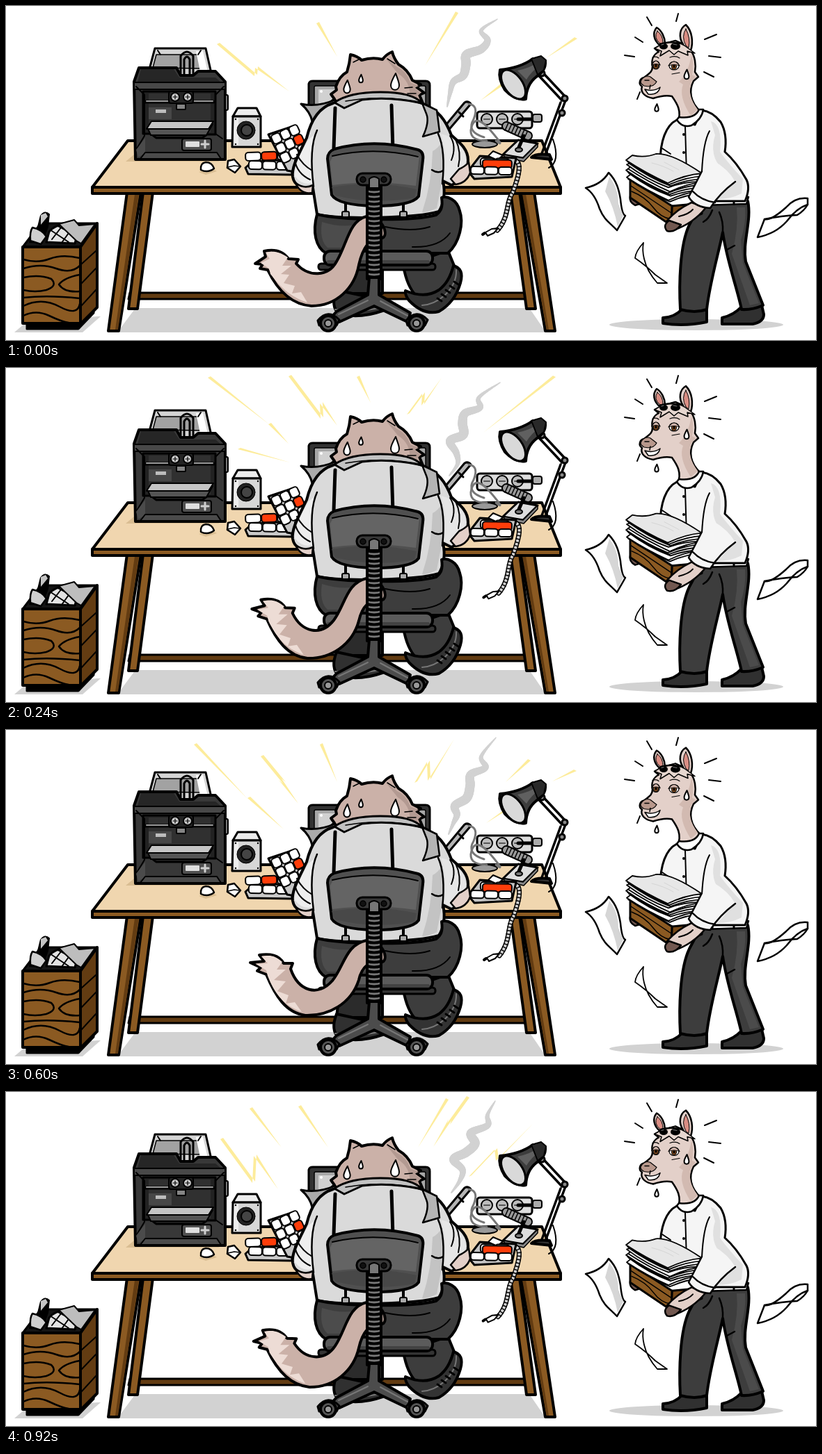
Animation of 1164 by 481 pixels, one loop 1000 ms. Source, as an HTML page with a canvas:

```html
<!DOCTYPE html>
<html lang="en">
<head>
<meta charset="utf-8">
<title>Busy workshop</title>
<style>
html, body { margin: 0; width: 100%; height: 100%; overflow: hidden; background: #fff; }
canvas { display: block; width: 1164px; height: 481px; }
</style>
</head>
<body>
<canvas id="stage"></canvas>
<script>
const W = 1164, H = 481;
const INK = '#000', WOOD = '#8b5a22', DARKWOOD = '#633c12', SHADOW = '#d2d2d2';
const COAL = '#3d3d3d', SHIRT = '#dadada', FUR = '#cbb1a8', CREAM = '#e3d0c9', RED = '#ff3d0a';
const canvas = document.getElementById('stage');
const ratio = window.devicePixelRatio || 1;
canvas.width = W * ratio;
canvas.height = H * ratio;
const ctx = canvas.getContext('2d');

function put(d, fill, width = 0, stroke = INK) {
  const path = new Path2D(d);
  if (fill) { ctx.fillStyle = fill; ctx.fill(path); }
  if (width) { ctx.strokeStyle = stroke; ctx.lineWidth = width; ctx.stroke(path); }
}
const line = (d, width = 2, color = INK) => put(d, null, width, color);

function oval(x, y, rx, ry, fill, width = 0, angle = 0) {
  ctx.beginPath();
  ctx.ellipse(x, y, rx, ry, angle, 0, 7);
  if (fill) { ctx.fillStyle = fill; ctx.fill(); }
  if (width) { ctx.strokeStyle = INK; ctx.lineWidth = width; ctx.stroke(); }
}

function box(x, y, w, h, r, fill, width = 0) {
  ctx.beginPath();
  ctx.roundRect(x, y, w, h, r);
  ctx.fillStyle = fill;
  ctx.fill();
  if (width) { ctx.strokeStyle = INK; ctx.lineWidth = width; ctx.stroke(); }
}

function tube(d, width, fill, edge = 3) {
  line(d, width);
  line(d, width - edge, fill);
  ctx.save();
  ctx.lineCap = 'butt';
  ctx.setLineDash([1.5, 3.5]);
  line(d, width);
  ctx.restore();
}

function at(x, y, angle, draw) {
  ctx.save();
  ctx.translate(x, y);
  ctx.rotate(angle);
  draw();
  ctx.restore();
}

const mix = (a, b, t) => a + (b - a) * t;

// Blends two paths that share the same commands.
function morph(a, b, t) {
  const ends = b.match(/-?\d+/g);
  let i = 0;
  return a.replace(/-?\d+/g, n => mix(+n, +ends[i++], t).toFixed(1));
}

function drop(x, y, s) {
  at(x, y, 0, () => {
    ctx.scale(s, s);
    put('M1-13C-4-4-6 0-6 4C-6 13 6 13 6 4C6 0 4-4 1-13Z', '#fff', 2 / s);
  });
}

const BOLTS = [
  [[303,55,357,101,358,89,407,123], [446,25,476,73], [650,10,602,86], [821,47,776,75], [715,114,682,136]],
  [[308,68,354,131,356,92,391,140], [350,24,396,80], [420,21,463,80], [636,11,592,80],
   [666,8,638,47,640,41,614,79], [665,122,702,83,704,99,757,46]],
  [[290,14,378,81], [377,81,406,109], [406,12,452,73,451,51,476,83], [504,13,524,50],
   [576,67,598,37,597,54,626,14], [333,117,408,136], [790,13,686,93]],
  [[270,21,347,99], [347,98,399,143], [366,38,398,77,392,72,420,106], [451,21,476,75],
   [587,76,605,46,606,73,644,13], [754,44,718,75], [820,59,785,74], [732,108,690,134]]
];

function bolt(p) {
  const points = [];
  for (let i = 0; i < p.length; i += 2) points.push([p[i], p[i + 1]]);
  const slant = p[0] < p[p.length - 2] ? 4 : -4;
  const back = points.slice(0, -1).reverse().map(([x, y]) => [x + slant, y - 2]);
  put('M' + points.concat(back).join('L') + 'Z', '#fdec9b');
}

const SMOKE = [
  [634,145, 638,126, 643,109, 657,100, 661,84, 662,70, 683,62, 692,49, 683,35, 706,19],
  [640,145, 652,128, 656,112, 643,97, 661,87, 674,74, 668,59, 692,48, 692,33, 703,13],
  [637,155, 649,138, 647,122, 638,105, 657,96, 656,79, 660,65, 681,57, 680,42, 710,21],
  [636,150, 643,134, 648,122, 645,109, 662,98, 667,80, 668,64, 689,54, 683,38, 704,11]
];

function smoke(k) {
  const i = Math.min(2, Math.floor(k)), t = Math.min(1, k - i);
  const p = SMOKE[i].map((v, n) => mix(v, SMOKE[i + 1][n], t));
  const last = p.length / 2 - 1;
  const point = n => { n = Math.max(0, Math.min(last, n)); return [p[2 * n], p[2 * n + 1]]; };
  const spline = (a, b, c, d, u) =>
    b + u * ((c - a) + u * ((2 * a - 5 * b + 4 * c - d) + u * (3 * b - a - 3 * c + d))) / 2;
  let from = point(0);
  ctx.strokeStyle = SHADOW;
  for (let s = 1; s <= 90; s++) {
    const q = s / 90, n = Math.min(last - 1, Math.floor(q * last));
    const around = [n - 1, n, n + 1, n + 2].map(point);
    const to = [0, 1].map(j => spline(...around.map(v => v[j]), q * last - n));
    ctx.lineWidth = 1.5 + 12 * Math.sin(Math.PI * q);
    ctx.beginPath();
    ctx.moveTo(...from);
    ctx.lineTo(...to);
    ctx.stroke();
    from = to;
  }
}

function floor() {
  put('M160 470L186 435H752L776 470Z', SHADOW);
  put('M12 470L26 458L131 447H136L110 470Z', SHADOW);
  oval(992, 459, 125, 8, SHADOW);
}

function bin() {
  put('M30 456V465H104L126 442V430Z', INK, 3);
  put('M24 347L50 313H131L107 347Z', '#151515', 3);
  put('M34 340L46 318L50 302Q56 294 62 300L60 318L52 341Z', INK, 2);
  put('M35 338Q34 325 38 319Q52 322 58 332L50 343Z', '#cfcfcf', 2.5);
  put('M50 301L57 298L60 303L50 315Z', '#c4c4c4');
  put('M58 340L62 325Q72 313 90 315L103 327L99 342Z', '#e4e4e4', 3);
  line('M66 324L90 340M75 317L101 331M83 314L66 336M95 320L80 341', 2);
  put('M76 314L98 308L105 316L128 314L108 342L101 338Z', '#bdbdbd', 2);
  put('M107 347L131 313V434L107 458Z', DARKWOOD, 4);
  put('M24 347H107V457H24Z', WOOD, 4);
  line('M25 365Q45 371 63 364T106 363M25 378Q50 370 72 378T106 374M25 432Q51 419 77 433T106 429M25 446Q43 437 62 446T90 456', 2.5);
  line('M25 391Q48 386 65 393Q75 403 58 409Q42 413 25 409M106 387Q84 391 76 401Q84 413 106 411M25 420Q60 416 106 421', 2.5);
  line('M108 372L130 352M108 400L130 377M108 432L130 408', 2);
}

function desk() {
  put('M178 413H758V422H176Z', DARKWOOD, 3);
  put('M197 268H211L189 436H176Z', WOOD, 4);
  put('M725 268H738L761 436H748Z', WOOD, 4);
  for (const [side, lit] of [['M174 268H194L162 468H147Z', 'M185 271H191L161 466H157Z'],
                             ['M740 268H759L789 468H775Z', 'M742 271H747L780 466H777Z']]) {
    put(side, WOOD, 4);
    put(lit, DARKWOOD);
  }
  put('M175 194H770L797 261H124Z', '#f0d6af', 4);
  put('M124 261H797V270H124Z', WOOD, 4);
  put('M184 214L172 224H305L318 218Z', '#d9bd92');
}

function printer() {
  put('M206 91L214 61H287L296 101H215Z', '#d5d5d5', 3);
  put('M211 89L216 70H279L284 90Z', '#a2a2a2', 1.5);
  put('M273 65H283L291 99H280Z', '#fff');
  line('M218 64L222 70M280 64L276 70', 2);
  line('M251 100V72Q260 60 269 72V100M256 100V77Q260 69 264 77V100', 3);
  put('M191 89H245L251 100H269L276 94H301L315 109V221H186L184 109Z', '#383838', 4);
  put('M194 91H241L249 103H301L309 110H189Z', '#262626');
  put('M184 110H315V120H184Z', '#484848', 2);
  put('M197 123H301V185H289L282 190H216L208 184H197Z', '#222', 3);
  put('M205 126H294V182H205Z', '#303030');
  put('M205 146H238V163H205Z', '#474747');
  line('M201 138H298', 5);
  line('M202 137H297', 2, '#999');
  box(234, 123, 35, 17, 3, '#242424', 2);
  for (const x of [243, 261]) {
    oval(x, 131, 6, 6, '#c9c9c9', 2);
    line(`M${x - 3} 131h6m-3-3v6`, 1.2);
  }
  box(245, 141, 13, 8, 1, '#858585', 2);
  box(215, 149, 15, 5, 0, '#bcbcbc');
  put('M204 177L208 186H288L297 170Z', '#555', 2);
  put('M209 166H298L291 177H202Z', '#c4c4c4', 2);
  line('M187 116L199 128V187L187 207M313 116L301 128V184L311 191', 2);
  put('M187 207L200 190V212L190 218Z', '#4b4b4b');
  box(253, 191, 42, 17, 3, '#505050', 2);
  box(258, 195, 20, 8, 1, '#dedede');
  line('M281 199H291M286 194V204', 3, '#cfcfcf');
  put('M193 220L200 211H303L309 220Z', '#4b4b4b', 2);
  box(315, 128, 4, 22, 2, '#777', 2);
}

function speaker() {
  put('M326 159L333 147H360L366 159Z', '#ececec', 3);
  put('M326 159H366V203H325Z', '#d7d7d7', 3);
  put('M328 161H334V200H328Z', '#eeeeee');
  oval(345, 179, 13, 13, '#222', 1);
  oval(346, 179, 8, 8, '#444', 2);
  for (const x of [330, 362]) for (const y of [163, 199]) oval(x, y, 1.2, 1.2, INK);
}

function keys(rows, cols, w, h, red) {
  for (let r = 0; r < rows; r++) for (let c = 0; c < cols; c++)
    box(c * w, r * h, w - 1, h - 1, 4, red.includes(r * cols + c) ? RED : '#fff', 2);
}

function keyboards() {
  put('M277 239L296 234L303 238L287 243Z', '#d9bd92');
  put('M280 236Q279 226 287 225Q296 225 299 234Q290 241 280 236Z', '#fff', 2.5);
  put('M318 233L319 223L328 221L337 231L329 240Z', '#fff', 2.5);
  line('M319 232L328 230L336 231', 1.5);
  put('M344 233L354 224L411 221V243L348 242Z', '#c9c9c9', 3);
  at(344, 211, -.03, () => keys(1, 3, 23, 13, [1]));
  at(349, 223, .02, () => keys(1, 3, 20, 13, []));
  put('M377 185L410 174L426 207L421 240L404 237Z', '#c6c6c6', 3);
  at(380, 187, -.43, () => keys(3, 3, 14, 15, [5]));
  put('M664 238L681 216L733 219L727 246L673 249Z', '#c4c4c4', 3);
  put('M693 216L700 209L714 215L706 222Z', '#fff', 2);
  at(682, 219, .02, () => { keys(1, 2, 21, 13, []); box(3, 2, 42, 12, 4, RED, 2); });
  at(668, 231, .02, () => keys(1, 3, 20, 12, []));
}

function gear(p) {
  box(677, 152, 79, 24, 4, '#dedede', 3);
  for (const x of [691, 713, 735]) {
    oval(x, 163, 8, 8, '#bdbdbd', 2);
    line(`M${x - 4} 163h8`, 2, '#555');
  }
  line('M736 163H765', 5);
  box(757, 156, 13, 11, 3, '#aaa', 2);
  oval(688, 199, 18, 5, '#999', 2);
  line('M691 194Q663 194 669 174T697 180T704 194', 3, '#777');
  at(0, -3 * p, 0, () => {
    put('M624 181L659 139Q664 136 668 141L634 181L628 188Z', '#b5b5b5', 3);
    line('M651 153L657 159', 3);
    line('M665 141Q680 143 672 163Q661 181 687 189', 3, '#777');
  });
  put('M714 214L736 193L764 198L743 219Z', '#dedede', 3);
  put('M715 214L743 219L764 198V203L744 224L717 218Z', '#888', 1.5);
  tube('M719 173L750 187', 14, '#999', 4);
  line('M744 187L736 206', 5);
  oval(737, 207, 5, 3, '#777', 2);
  const cord = morph('M727 223C748 219 731 260 728 269C718 282 724 304 706 323',
                     'M727 223C748 219 732 260 729 269C720 282 726 304 709 325', p);
  tube(cord, 7, '#d2d2d2');
  at(2 * p, 2 * p, 0, () => {
    put('M707 320L701 327L692 331L689 326L698 321Z', '#fff', 2);
    line('M688 327L685 329', 4);
  });
}

function lamp() {
  line('M786 192Q797 224 780 233', 2);
  for (const [x, y] of [[0, 0], [7, -3]])
    line(`M${757 + x} ${91 + y}L${799 + x} ${136 + y}M${797 + x} ${139 + y}L${769 + x} ${215 + y}`, 3.5);
  for (const [x, y] of [[770, 97], [803, 133], [799, 154]]) oval(x, y, 4, 4, '#888', 3);
  put('M755 218Q760 212 781 214L784 221Z', '#333', 4);
  put('M710 92Q739 89 757 76L775 80Q776 93 762 102Q748 113 747 134Q732 137 717 121Q707 105 710 92Z', COAL, 4);
  put('M735 93Q754 89 766 80L769 84Q754 95 748 106Z', '#606060');
  oval(729, 113, 13, 24, '#d9d9d9', 3, -.62);
  put('M755 76L769 72L776 78L773 92L764 99Z', '#292929', 2);
}

function catBody(p) {
  put('M435 150V112Q436 108 441 108H603Q609 108 609 114V150Z', '#333', 3);
  box(443, 115, 160, 35, 2, '#a7a7a7', 1.5);
  box(449, 120, 26, 25, 1, '#d1d1d1');
  oval(453, 123, 2, 2, '#fff');
  put('M473 143L466 139L472 134L467 127L475 121L474 116Q479 101 490 95Q494 82 495 70Q505 72 511 78Q527 73 541 77Q547 69 555 66Q557 75 564 84Q578 92 584 107L596 113L590 117L601 125L594 128L599 140Z', FUR, 4);
  put('M546 76Q556 83 562 88Q575 93 581 110L593 115L587 118L596 125L591 130L594 138L580 130Q582 109 563 97Z', '#b39a92');
  line('M499 81L507 77M548 76L559 83M573 118L584 117M577 126L589 126', 1.5);
  drop(490, 117, .78);
  drop(510, 105 + p, .48);
  drop(559, 110 + 3 * p, 1);
  put('M424 141Q448 146 473 135L482 146L440 166Q437 152 424 141Z', '#aaa', 3);
  put('M470 140C450 146 438 165 432 190C420 215 410 232 412 246C414 258 425 264 441 262L447 300C480 308 590 306 622 296C632 280 630 262 628 252L640 258C655 252 664 240 664 222C664 205 650 195 640 186C632 165 622 150 598 140C560 126 500 128 470 140Z', SHIRT, 4);
  put('M435 192Q415 225 415 245Q426 259 440 255Q438 215 446 183Z', '#eeeeee');
  put('M635 187Q660 203 661 222Q658 245 640 254L630 249Q634 213 625 184Z', '#e6e6e6');
  put('M613 209Q621 205 627 195L626 254L619 291Q607 297 598 297Q612 255 613 209Z', '#c3c3c3');
  put('M472 139Q493 124 538 124Q584 124 598 140Q552 130 512 135L486 147Z', '#c2c2c2', 3);
  line('M488 137Q538 128 591 138', 1.5);
  put('M598 140L619 150L623 181L599 188Q609 167 604 155Z', '#b4b4b4', 2.5);
  line('M447 179Q435 205 442 260M621 184Q632 208 627 256M612 236Q621 242 628 237', 2.5);
  line('M415 222Q418 241 437 250M418 214Q426 229 440 237M638 187Q648 202 640 222M646 192Q655 211 650 231', 2);
  put('M416 255Q428 264 441 258L440 269Q424 272 416 255Z', CREAM, 2.5);
  put('M651 235Q660 231 665 225L667 240Q662 255 646 257L639 249Z', CREAM, 2.5);
  line('M473 147L471 205M554 143L556 207', 5);
  line('M488 281V302M571 281V302', 4);
  for (const x of [488, 571]) box(x - 5, 296, 10, 8, 2, '#aaa', 2);
}

function catLegs() {
  put('M479 377L475 414H541V377Z', '#2b2b2b', 4);
  put('M475 409Q466 432 478 443Q507 451 541 439L544 424Z', '#303030', 4);
  line('M473 437Q505 443 543 433', 2, '#777');
  put('M571 374Q576 404 590 418Q612 424 632 405L644 374L635 352Z', COAL, 4);
  put('M643 374Q659 378 653 399Q645 427 622 440Q600 446 579 424Q573 416 574 410Q602 422 622 409Q637 398 643 374Z', '#333', 4);
  line('M647 380Q648 400 630 417Q615 430 598 431', 2, '#777');
  for (let i = 0; i < 5; i++) line(`M${644 - i * 6} ${397 + i * 6}l6 4`, 3);
  put('M447 300C440 325 445 348 460 356H635C652 341 658 312 652 295C648 278 633 273 626 276C628 290 625 296 618 301C580 311 480 308 447 300Z', COAL, 4);
  put('M454 311Q491 323 525 309L519 348H462Q450 337 454 311Z', '#4c4c4c');
  line('M545 318Q584 326 609 318M584 347Q623 348 638 327', 2);
  box(449, 371, 168, 9, 4, '#343434', 3);
  box(457, 353, 156, 20, 9, '#5b5b5b', 4);
  box(461, 366, 148, 5, 3, '#424242');
}

function tail(p) {
  put(morph(
    'M541 334C523 331 512 350 507 373C501 406 475 432 439 432C410 430 390 409 376 380L365 378L369 372L358 371L373 361L371 353C384 350 397 352 406 364L420 365L417 371C435 391 463 390 475 368C490 343 493 309 518 303C540 302 551 329 541 334Z',
    'M541 334C523 331 511 341 507 360C496 394 464 412 430 411C402 407 387 383 374 352L361 347L366 342L351 335L371 333L364 324C380 322 392 324 399 336L412 336L409 344C420 376 448 385 469 361C486 340 488 309 518 303C540 302 551 329 541 334Z', p), FUR, 4);
  put(morph(
    'M373 355L379 364L366 370L378 378L380 386C394 404 407 418 433 427L424 412L411 414L415 403L399 399L407 387L395 386L410 374L397 374L405 362C390 352 383 353 373 355Z',
    'M367 326L376 336L359 337L374 346L376 354C385 377 397 396 425 406L415 392L402 394L406 382L390 376L402 362L385 360L402 345L389 345L397 334C386 324 379 324 367 326Z', p), '#eddcd5');
}

function chair() {
  put('M472 206Q530 190 592 207Q601 210 599 222L593 274Q583 288 530 288Q477 287 468 272L462 220Q462 210 472 206Z', '#505050', 4);
  put('M470 216Q529 201 594 216L589 259Q529 250 469 258L466 224Z', '#646464');
  put('M468 261Q529 250 590 264L587 276Q529 287 473 273Z', '#484848');
  line('M469 216Q529 202 592 217', 2);
  put('M519 255H539V393H519Z', '#777', 4);
  for (let y = 263; y < 390; y += 7) line(`M519 ${y}Q529 ${y + 3} 539 ${y}`, 4);
  box(504, 241, 49, 17, 8, '#383838', 3);
  for (const x of [513, 543]) oval(x, 250, 4, 4, '#111', 1.5);
  put('M522 249V262H536V249Q529 243 522 249Z', '#777', 2);
  put('M522 391H536V416L581 442L577 455L529 432L479 455L464 452L475 440L520 416Z', '#4c4c4c', 4);
  line('M520 424L478 444M538 425L577 446', 2, '#777');
  for (const x of [463, 590]) {
    put(`M${x - 15} 453Q${x} 435 ${x + 16} 452L${x + 12} 460H${x - 13}Z`, '#444', 3);
    oval(x, 457, 11, 11, '#555', 4);
    oval(x, 457, 5, 5, '#999', 2);
  }
}

function flyingPaper() {
  put('M833 262Q856 257 866 240C878 252 881 266 883 278Q885 300 890 302Q885 311 878 323C868 312 860 309 853 292Q846 270 833 262Z', '#fff', 2.5);
  put('M867 246Q880 262 880 285L887 302L879 318Q874 290 861 267Z', '#d6d6d6');
  put('M916 341Q905 353 904 363Q920 374 933 387L950 399L936 399Q921 382 917 364Q914 352 916 341Z', '#fff', 1.8);
  put('M1152 277Q1134 275 1121 290Q1100 309 1090 307L1080 333Q1106 328 1122 310Q1136 291 1152 286Z', '#fff', 2.5);
  line('M1090 307Q1115 302 1137 301Q1147 295 1152 286', 2.5);
}

function llamaBody() {
  put('M971 437Q961 448 944 449V457Q975 462 1007 455V438Z', '#303030', 4);
  put('M1057 433Q1046 445 1029 449V458H1073Q1089 455 1089 444L1086 431Z', '#303030', 4);
  put('M1000 281H1066C1072 309 1058 339 1063 368L1088 431Q1072 438 1057 437C1051 407 1036 368 1030 326C1023 360 1011 400 1007 437Q990 443 969 437C967 402 968 344 982 315Z', COAL, 4);
  put('M1050 290H1062Q1064 313 1056 337L1059 370L1082 428L1069 431L1043 357Q1053 321 1050 290Z', '#4b4b4b');
  line('M1025 297Q1031 310 1030 326M1036 351L1047 345M1015 294Q1010 307 1002 311', 2.5);
  put('M1000 277L1067 275L1064 285L1001 287Z', '#fff', 2.5);
  line('M1015 278V286M1046 277V285', 3);
  line('M921 16L928 28M966 11L963 22M904 45L915 52M889 71L903 73M907 134L911 124M1021 41L1004 48M1010 72L1027 74M1003 95L1017 102', 2);
}

function llamaHead(p) {
  at(0, -1.5 * p, 0, () => {
    put('M965 168C972 152 964 140 957 130C948 128 939 130 930 133C918 131 911 124 914 116C908 112 911 104 917 103C926 96 929 94 929 87C927 78 930 70 938 66L932 61L940 57C930 49 929 38 935 31C942 35 947 45 947 54L962 50L973 55C966 45 968 32 977 27C986 36 988 52 984 64C990 72 992 84 990 95L995 102L988 108C981 122 983 138 998 152L985 172Z', CREAM, 2.5);
    put('M985 70Q989 82 986 99L991 102L985 109Q978 128 994 149L984 158Q966 130 973 113L967 109Q981 96 985 70Z', '#d2bab1');
    put('M936 36Q930 46 940 54L944 53Q944 42 936 36Z', '#d98d83', 1);
    put('M977 33Q970 44 977 57L981 60Q984 46 977 33Z', '#d98d83', 1);
    put('M914 105Q920 99 926 102L935 109Q930 118 917 115Q909 111 914 105Z', '#b8988c', 1.2);
    line('M918 107L924 107M926 114L925 119', 1.5);
    put('M918 120Q930 124 940 117Q937 129 923 127Z', '#fff', 1.5);
    for (const [x, y, r] of [[934, 85, 5], [960, 86, 7]]) {
      oval(x, y, r, 6, '#fff', 1.2);
      oval(x, y + 1, 3.5, 4.5, '#75441d', 1);
      oval(x, y + 1, 1.4, 2, INK);
      put(`M${x - r - 1} ${y}Q${x} ${y - 12} ${x + r + 1} ${y}Q${x} ${y - 3} ${x - r - 1} ${y}Z`, '#ceb2a8', 1.2);
    }
    line('M929 74Q935 72 938 75M954 74Q962 71 968 75M957 98L968 96', 1.2);
    put('M932 61L942 55L962 50L975 57L990 68L979 65L980 71L966 65L960 70L953 64L940 72L942 65Z', '#e7d7d0', 1.5);
    oval(945, 58, 6, 4.5, INK);
    oval(962, 58, 7, 5, INK);
    line('M940 55Q953 50 969 54', 2.5);
    line('M942 56L945 55M959 55L964 56', 1.2, '#777');
    drop(978, 99 - 3 * p, .57);
    drop(935, 147 - 2 * p, .45);
  });
}

function llamaShirt() {
  put('M964 164C948 172 940 195 940 226L985 270L1012 281H1062Q1070 262 1064 250Q1050 225 1033 210Q1037 184 1027 167Q1015 152 1000 150L990 171Z', '#f5f5f5', 3);
  put('M1013 166Q1030 170 1026 210Q1039 228 1059 249L1057 270Q1042 278 1021 278Q1052 253 1029 235Q1010 215 1019 186Z', '#e0e0e0');
  put('M964 164Q972 176 985 172Q1000 163 1002 149L996 149Q990 163 967 160Z', '#fff', 2.5);
  line('M976 173L978 243M1011 180Q1002 196 1000 238M943 205L955 213', 2);
  for (const y of [185, 211]) oval(974, y, 2, 2, INK);
}

function carriedStack(p) {
  at(0, -5 * p, 0, () => {
    put('M897 274Q895 282 904 287L914 284L911 276Z', '#725850', 2.5);
    put('M957 288L1000 284V299L956 316Z', '#764817', 3);
    put('M897 249L957 288L956 316L897 276Z', WOOD, 3);
    line('M898 259L956 298M899 267Q919 275 930 290T956 307M959 300L998 293', 1.5);
    for (let i = 9; i >= 0; i--) at(i * 7 % 5 - 2, i * 3.1, 0, () => {
      const lift = i * 5 % 4;
      put(`M893 ${222 - lift}L902 215Q920 219 936 213Q958 211 1002 ${241 + lift}Q978 243 953 ${255 - lift}Q922 241 893 ${222 - lift}Z`,
        i % 3 ? '#fff' : '#e7e7e7', 1.8);
    });
    line('M928 226Q945 230 959 238M946 225L967 236', 1, '#d5d5d5');
    put('M985 283Q964 293 950 309Q946 320 959 323Q988 313 1006 290Z', CREAM, 2.5);
    put('M953 309Q943 316 950 324Q961 327 970 315Z', '#725850', 2.5);
    line('M967 303Q981 300 987 293', 2);
  });
  at(0, -3 * p, 0, () => {
    put('M1000 238L981 275Q990 290 1012 291Q1025 270 1048 253Q1038 235 1017 223Z', '#f5f5f5');
    line('M1000 238L981 275Q990 290 1012 291Q1025 270 1048 253M987 267Q999 280 1019 283', 2.5);
  });
}

const STEPS = [[0, 0], [40, .33], [80, .66], [120, 1], [160, 1.5], [240, 2], [320, 2.5], [360, 3], [480, 3.3],
  [520, 3.1], [600, 3], [640, 2.5], [720, 2], [800, 1.6], [840, 1.4], [880, 1.2], [920, 1]];

function paint(k) {
  const p = k / 3;
  ctx.setTransform(ratio, 0, 0, ratio, 0, 0);
  ctx.fillStyle = '#fff';
  ctx.fillRect(0, 0, W, H);
  ctx.lineJoin = ctx.lineCap = 'round';
  floor();
  BOLTS[Math.min(3, Math.round(k))].forEach(bolt);
  smoke(k);
  bin();
  desk();
  printer();
  speaker();
  gear(p);
  lamp();
  keyboards();
  catBody(p);
  catLegs();
  tail(p);
  chair();
  flyingPaper();
  llamaBody();
  llamaHead(p);
  llamaShirt();
  carriedStack(p);
}

let shown = null;
function tick() {
  const time = performance.now() % 1000;
  const step = STEPS.findLast(([start]) => start <= time);
  if (step !== shown) paint((shown = step)[1]);
  requestAnimationFrame(tick);
}
tick();
</script>
</body>
</html>
```
